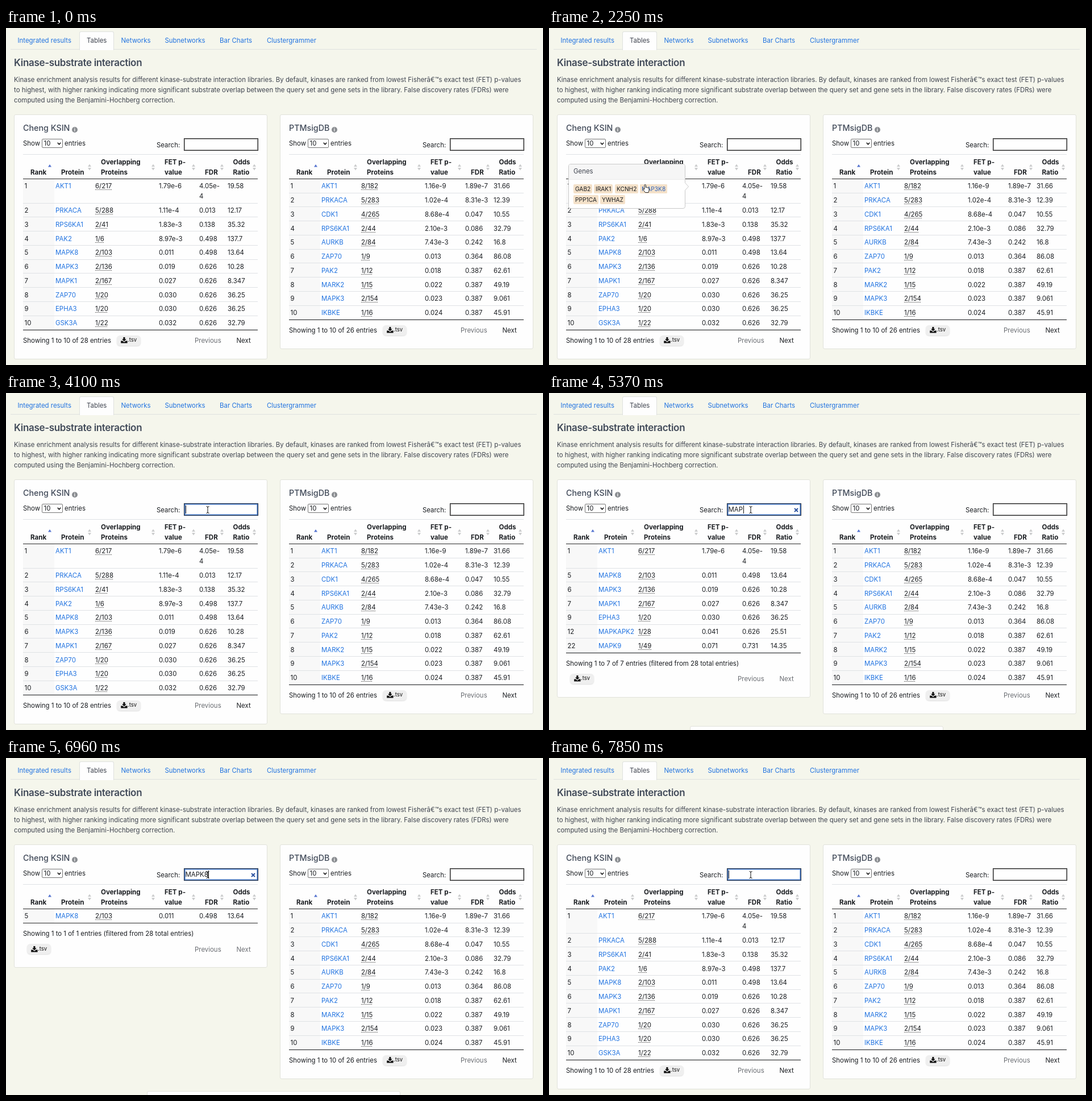
These frames come from a looping animation (945 by 593 pixels, 8000 ms). An HTML page:

```html
<!DOCTYPE html>
<html lang="en">
<head>
<meta charset="utf-8">
<title>Kinase tables</title>
<style>
  html, body { margin: 0; width: 100%; height: 100%; overflow: hidden; background: #f5f6ec; }
  #stage {
    position: relative; width: 945px; height: 593px; overflow: hidden; background: #f5f6ec;
    font: 11.43px/18px Inter, "Noto Sans", sans-serif; color: #1a1d21;
  }
  #stage div, #stage svg, .t { position: absolute; }
  .t { white-space: nowrap; }
  .group { left: 0; top: 0; }
  .link { color: #2173e0; }
  .soft { color: #6a6d72; }
  .body { color: #3f444f; }
  .bold { font-weight: 700; font-size: 11.6px; }
  h1, h2 { margin: 0; color: #414a59; }
  h1 { font-weight: 600; font-size: 17px; letter-spacing: -.33px; }
  h2 { font-weight: 500; font-size: 14.3px; }
  .overlap { text-decoration: underline dotted #333 1px; text-underline-offset: 1.5px; }

  .tab { left: 129px; top: 6px; width: 59px; height: 32px; background: #fefefe; border: 1px solid #dfe2df; border-bottom: 0; border-radius: 3px 3px 0 0; }
  .rule { left: 8px; top: 37px; width: 926px; height: 1px; background: #dfe2df; }
  .card { box-sizing: border-box; width: 446px; background: #fefefe; border: 1px solid #e1e2da; border-radius: 3px; }
  .info { display: inline-block; width: 10px; height: 10px; margin-left: 3.5px; vertical-align: -.5px; border-radius: 50%; background: #8a8d91; color: #fff; font: 700 8px/10px Inter, sans-serif; text-align: center; }
  .select { box-sizing: border-box; left: 63px; top: 195px; width: 37px; height: 16px; border: 1px solid #757575; border-radius: 2px; background: #fff; }
  .input { box-sizing: border-box; left: 313px; top: 194px; width: 131px; height: 22px; border: 1px solid #262626; box-shadow: inset 0 0 0 1px #9c9c9c; background: #fff; }
  .focus { border-color: #26303f; box-shadow: inset 0 0 0 1.6px #4376c4; }
  .caret { display: inline-block; width: 1px; height: 14px; margin-left: .5px; vertical-align: -2.5px; background: #111; }

  .line { left: 30px; width: 413px; height: 1px; }
  .row { left: 30px; width: 413px; box-sizing: border-box; border-bottom: 1px solid #dfe2e5; background: linear-gradient(#f8f8f8, #f8f8f8) 0 0 / 55px 100% no-repeat; }
  .button { width: 42px; height: 18px; border-radius: 6px; background: #efefef; box-shadow: 0 1px 2px #0002; color: #111; }
  .label { font-size: 9.6px; }

  .popover { box-sizing: border-box; left: 33.5px; top: 238.5px; width: 206.5px; height: 79.5px; border: 1px solid #c9c9c9; border-radius: 4px; background: #fff; animation: fade 8s linear infinite; }
  .popover .head { left: 0; top: 0; width: 100%; height: 26px; border-bottom: 1px solid #ebebeb; border-radius: 3px 3px 0 0; background: #f6f6f6; }
  .chip { height: 16px; padding: 0 3px; border-radius: 2px; background: #f4e1c9; font-size: 10.2px; line-height: 16.5px; white-space: nowrap; }
  .chip.hover { color: #2f62b8; }

  #cursor { left: 0; top: 0; animation: path 8s linear infinite; }
  #cursor svg { overflow: visible; }

  @keyframes fade {
    0%, 18.75% { opacity: 0; }
    21.5%, 41% { opacity: 1; }
    44%, 100% { opacity: 0; }
  }
  @keyframes path {
    0%, 6.25% { transform: translate(11px, 294px); }
    9.5% { transform: translate(62px, 266px); }
    12.8% { transform: translate(130px, 262px); }
    15.875% { transform: translate(158px, 273px); }
    17%, 28% { transform: translate(167px, 274px); }
    28.125%, 29.3% { transform: translate(169px, 275px); }
    34.125%, 41.625% { transform: translate(258px, 266px); animation-timing-function: ease-in-out; }
    49.5%, 100% { transform: translate(355px, 205px); }
  }
</style>
</head>
<body>
<div id="stage"></div>
<script>
const LOOP = 8000, TABLE_TOP = 265.75, ROW = 24.75, TALL_ROW = 42.75, RIGHT = 468;
const stage = document.getElementById('stage');
const columns = [32.5, 87, 157, 269, 340, 390];

// "|" marks a wrapped cell
const kinases = `1 AKT1 6/217 1.79e-6 4.05e-|4 19.58
2 PRKACA 5/288 1.11e-4 0.013 12.17
3 RPS6KA1 2/41 1.83e-3 0.138 35.32
4 PAK2 1/6 8.97e-3 0.498 137.7
5 MAPK8 2/103 0.011 0.498 13.64
6 MAPK3 2/136 0.019 0.626 10.28
7 MAPK1 2/167 0.027 0.626 8.347
8 ZAP70 1/20 0.030 0.626 36.25
9 EPHA3 1/20 0.030 0.626 36.25
10 GSK3A 1/22 0.032 0.626 32.79
12 MAPKAPK2 1/28 0.041 0.626 25.51
22 MAPK9 1/49 0.071 0.731 14.35`.split('\n');

const signatures = `1 AKT1 8/182 1.16e-9 1.89e-7 31.66
2 PRKACA 5/283 1.02e-4 8.31e-3 12.39
3 CDK1 4/265 8.68e-4 0.047 10.55
4 RPS6KA1 2/44 2.10e-3 0.086 32.79
5 AURKB 2/84 7.43e-3 0.242 16.8
6 ZAP70 1/9 0.013 0.364 86.08
7 PAK2 1/12 0.018 0.387 62.61
8 MARK2 1/15 0.022 0.387 49.19
9 MAPK3 2/154 0.023 0.387 9.061
10 IKBKE 1/16 0.024 0.387 45.91`.split('\n');

// Text whose capitals are centred on y
const text = (s, x, y, cls = '', tag = 'span') =>
  `<${tag} class="t ${cls}" style="left:${x}px;top:${y - 9}px">${s}</${tag}>`;
const box = (cls, style, inner = '') => `<div class="${cls}" style="${style}">${inner}</div>`;
const card = (x, y, bottom) => box('card', `left:${x}px;top:${y}px;height:${bottom - y}px`);
const line = (y, color) => box('line', `top:${y}px;background:${color}`);

function add(html, parent = stage) {
  parent.insertAdjacentHTML('beforeend', html);
  return parent.lastElementChild;
}

// Visible only during the given [from, to] spans in ms
function show(el, ...spans) {
  const key = (opacity, time) => ({ opacity, offset: time / LOOP, easing: 'step-end' });
  const frames = spans.flatMap(([from, to]) => [key(1, from), key(0, to)]);
  if (spans[0][0] > 0) frames.unshift(key(0, 0));
  if (frames.at(-1).offset < 1) frames.push(key(0, LOOP));
  el.animate(frames, { duration: LOOP, iterations: Infinity });
}

function button(x, y) {
  return box('button', `left:${x}px;top:${y - 9}px`,
    `<svg style="left:7px;top:3.5px" width="12" height="11" fill="#111">
       <path d="M4.4 0h3v3.6h2.4L5.9 7.6 2 3.6h2.4z"/>
       <path d="M.2 6.6h2.9l2.8 2.5 2.8-2.5h2.9v3.9H.2z"/></svg>` +
    text('.tsv', 19, 8.7, 'label'));
}

function rowsHtml(rows) {
  let y = TABLE_TOP, html = '';
  const classes = ['', 'link', 'overlap', '', '', ''];
  for (const row of rows) {
    const height = row.includes('|') ? TALL_ROW : ROW;
    const cells = row.split(' ').map((cell, i) =>
      text(cell.replace('|', '<br>'), columns[i] - 30, 12.5, classes[i]));
    html += box('row', `top:${y}px;height:${height}px`, cells.join(''));
    y += height;
  }
  return { html: html + line(y - .5, '#2a2a2a'), bottom: y };
}

function tableHtml(rows, total, shown, filtered) {
  const { html, bottom } = rowsHtml(rows);
  const note = filtered ? ' (filtered from 28 total entries)' : '';
  const y = bottom + (filtered ? 46 : 19);
  return card(14, 151.5, bottom + (filtered ? 78.5 : 52)) + html +
    text(`Showing 1 to ${shown} of ${total} entries${note}`, 30, bottom + 18.5) +
    button(filtered ? 37 : 195, y - .5) +
    text('Previous', 332, y, 'soft') +
    text('Next', 405.5, y, total > 10 ? '' : 'soft');
}

function controlsHtml(title) {
  const heads = [['Rank', 43], ['Protein', 97], ['Overlapping<br>Proteins', 167],
                 ['FET p-<br>value', 279], ['FDR', 350], ['Odds<br>Ratio', 399.5]];
  const sorters = [147, 258.5, 330, 379.5, 436.5];
  return text(title + '<i class="info">i</i>', 30, 176, '', 'h2') +
    text('Show', 30, 203) + box('select', '') + text('10', 66.5, 203) +
    `<svg style="left:90px;top:200.5px" width="7" height="5"><path d="M.8.8l2.7 3 2.7-3" fill="none" stroke="#111" stroke-width="1.5"/></svg>` +
    text('entries', 103, 203) + text('Search:', 265, 205.5) +
    box('input', '') + line(222, '#dfe2e5') + line(265, '#2a2a2a') +
    heads.map(([s, x]) => text(s, x, s.includes('<') ? 235.5 : 253.5, 'bold')).join('') +
    `<svg style="left:74px;top:239.5px" width="6" height="5"><path d="M0 4.4L3 0l3 4.4z" fill="#5574cf"/></svg>` +
    sorters.map(x => `<svg style="left:${x - 3}px;top:239px" width="6" height="12"><path d="M0 5l3-4.6L6 5zM0 7h6l-3 4.6z" fill="#cbcccd"/></svg>`).join('');
}

// Page head
add(box('rule', '') + box('tab', ''));
[['Integrated results', 20.5], ['Tables', 142], ['Networks', 202.5], ['Subnetworks', 279.5],
 ['Bar Charts', 376], ['Clustergrammer', 459]].forEach(([s, x]) =>
  add(text(s, x, 21.7, s === 'Tables' ? 'body' : 'link')));
add(text('Kinase-substrate interaction', 14, 60.5, '', 'h1'));
add(text(`Kinase enrichment analysis results for different kinase-substrate interaction libraries. By default, kinases are ranked from lowest Fisherâ€™s exact test (FET) p-values<br>
to highest, with higher ranking indicating more significant substrate overlap between the query set and gene sets in the library. False discovery rates (FDRs) were<br>
computed using the Benjamini-Hochberg correction.`, 14, 91.3, 'body'));

// Right table and the card below
add(box('group', `left:${RIGHT}px`, tableHtml(signatures, 26, 10) + controlsHtml('PTMsigDB')));
show(add(card(247.5, 586, 640)), [5370, 7550]);

// Left table: one layer per search query
const pick = ranks => kinases.filter(r => ranks.includes(parseInt(r)));
const queries = [
  { q: '', ranks: [1, 2, 3, 4, 5, 6, 7, 8, 9, 10], total: 28, on: [[0, 5180], [7650, LOOP]],
    caret: [[4100, 4590], [5080, 5180], [7850, LOOP]] },
  { q: 'M', ranks: [1, 2, 3, 4, 5, 6, 7, 8, 9, 10], total: 19, on: [[5180, 5370], [7550, 7650]] },
  { q: 'MA', ranks: [1, 2, 5, 6, 7, 9, 12, 22], on: [[7350, 7550]] },
  { q: 'MAP', ranks: [1, 5, 6, 7, 9, 12, 22], on: [[5370, 5570], [7250, 7350]] },
  { q: 'MAPK', ranks: [5, 6, 7, 12, 22], on: [[5570, 5860], [7060, 7250]] },
  { q: 'MAPK8', ranks: [5], on: [[5860, 7060]], caret: [[5860, 6360], [6860, 7060]] },
];
for (const { q, ranks, total = ranks.length, on } of queries) {
  show(add(box('group', '', tableHtml(pick(ranks), total, ranks.length, q !== ''))), ...on);
}
add(box('group', '', controlsHtml('Cheng KSIN')));
show(add(box('input focus', '')), [4050, LOOP]);
for (const { q, on, caret = on } of queries) {
  const clear = q && `<svg style="left:430.5px;top:202px" width="8" height="8"><path d="M1 1l6 6M7 1L1 7" stroke="#2c53a0" stroke-width="2"/></svg>`;
  const layer = add(box('group', '', text(q + '<i class="caret"></i>', 315.5, 205.3) + clear));
  show(layer, ...on);
  show(layer.querySelector('.caret'), ...caret);
}

// Gene popover
const chip = (s, x, y, cls = '') => box('chip ' + cls, `left:${x - 34.5}px;top:${y - 239.5}px`, s);
const popover = add(box('popover', '',
  box('head', '') + text('Genes', 8.5, 12.7, 'body') +
  `<svg style="left:204px;top:32px" width="8" height="14"><path d="M0 0l6.5 7L0 14z" fill="#fff"/><path d="M.5.5l6 6.5-6 6.5" fill="none" stroke="#c9c9c9"/></svg>` +
  chip('GAB2', 43, 275) + chip('IRAK1', 79, 275) + chip('KCNH2', 116, 275) + chip('MAP3K8', 160, 275) +
  chip('PPP1CA', 43, 294.3) + chip('YWHAZ', 90, 294.3)));
show(add(chip('MAP3K8', 160, 275, 'hover'), popover), [2250, 2480]);

// Pointer: arrow, hand, text beam
const cursor = add('<div id="cursor"></div>');
const arrow = add(`<svg width="10" height="15"><path d="M0 0v11.6l2.7-2.5 1.7 4 1.8-.8-1.7-3.9h3.7z" fill="#000" stroke="#fff" stroke-width=".9"/></svg>`, cursor);
const hand = add(`<svg style="left:-4px" width="13" height="16"><path d="M3 9V1.7a1.2 1.2 0 0 1 2.4 0v3.9q1.2-.8 2 .3 1.3-.5 1.9.5 1.7-.3 1.7 1.4V11l-1 3.5H4.4L.6 9.3q-.4-1.5 1-1.2z" fill="#fff" stroke="#111" stroke-width=".9"/></svg>`, cursor);
const beam = add(`<svg style="left:-3px;top:-6.5px" width="6" height="13"><path d="M.5.5Q3 .5 3 2.5 3 .5 5.5.5M3 2.5v8M.5 12.5Q3 12.5 3 10.5q0 2 2.5 2" fill="none" stroke="#111"/></svg>`, cursor);
show(arrow, [500, 1360], [2480, 3860]);
show(hand, [1360, 2480]);
show(beam, [3860, LOOP]);
</script>
</body>
</html>
```
